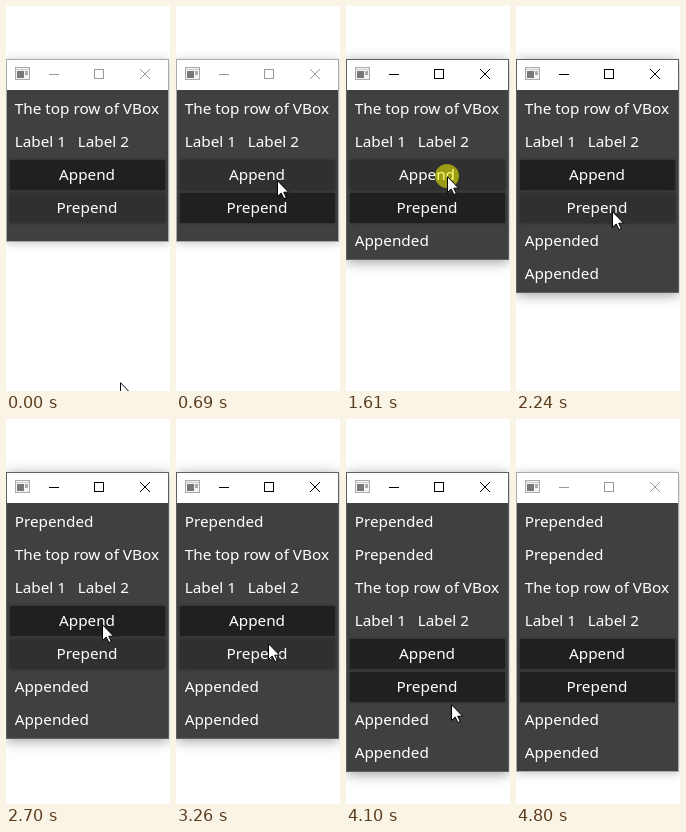
Write an HTML page that moves like this. It is 164 px wide and 385 px high and loops after 4.97 s.

```html
<!DOCTYPE html>
<html lang="en">
<head>
<meta charset="utf-8">
<title>VBox append and prepend</title>
<style>
html, body { margin: 0; width: 100%; height: 100%; overflow: hidden; background: #fff; }
#stage { position: relative; width: 164px; height: 385px; overflow: hidden; background: #fff; }
#win {
  position: absolute; left: 0; top: 53px; width: 163px; box-sizing: border-box;
  border: 1px solid #aaa; background: #404040; overflow: hidden;
  box-shadow: 0 1px 9px rgba(0, 0, 0, .24);
}
#win.active { border-color: #606060; box-shadow: 0 2px 12px rgba(0, 0, 0, .38); }
#bar { position: absolute; left: 0; top: 0; width: 161px; height: 30px; background: #fff; color: #999; }
.active #bar { color: #000; }
.row {
  position: absolute; left: 0; top: 34px; width: 161px; height: 30px;
  font: 15.3px/29px "Noto Sans", "Open Sans", sans-serif; color: #fff; white-space: pre;
}
.row span { position: absolute; top: 0; }
.button {
  left: 3px; width: 155px; text-align: center; text-indent: -1px; background: #202020;
  box-shadow: 0 0 3px rgba(0, 0, 0, .4);
}
.button.hover { background: #303030; }
#ring {
  position: absolute; left: -12px; top: -12px; width: 24px; height: 24px;
  border-radius: 50%; background: rgba(255, 255, 0, .52);
}
#pointer { position: absolute; left: 0; top: 0; }
svg { position: absolute; left: 0; top: 0; overflow: visible; }
</style>
</head>
<body>
<div id="stage">
  <div id="win">
    <div id="bar">
      <svg width="161" height="30" fill="none" stroke="currentColor" shape-rendering="crispEdges">
        <rect x="8.5" y="7.5" width="14" height="12" fill="#f4f4f4" stroke="#aaa"/>
        <path d="M9 9.5h13" stroke="#ccc"/>
        <path d="M10 11h7v7h-7z" fill="#777" stroke="none"/>
        <path d="M18 11h3v4h-3z" fill="#aaa" stroke="none"/>
        <path d="M42 14.5h10M87.5 9.5h9v9h-9z"/>
        <path d="M133 9l10 10M143 9l-10 10" shape-rendering="auto"/>
      </svg>
    </div>
  </div>
  <div id="pointer">
    <div id="ring"></div>
    <svg width="12" height="19">
      <path d="M.5.7v15.8l3.7-3.5 2.7 5.6 2.4-1.1-2.6-5.3h4.9z" fill="#fff" stroke="#000"/>
    </svg>
  </div>
</div>
<script>
const LOOP = 4970;
const $ = id => document.getElementById(id);
const win = $("win"), pointer = $("pointer"), ring = $("ring");

function addRow(texts, button) {
  const row = document.createElement("div");
  row.className = button ? "row button" : "row";
  if (button) row.textContent = texts[0];
  else texts.forEach((text, i) => {
    const span = document.createElement("span");
    span.textContent = text;
    span.style.left = 7.7 + i * 63 + "px";
    row.append(span);
  });
  win.append(row);
  return row;
}

const before = [addRow(["Prepended"]), addRow(["Prepended"])];
const rows = [
  addRow(["The top row of VBox"]),
  addRow(["Label 1", "Label 2"]),
  addRow(["Append"], true),
  addRow(["Prepend"], true),
  addRow(["Appended"]),
  addRow(["Appended"])
];

const appendTimes = [920, 1860];
const prependTimes = [2700, 3780];
const clicks = [[770, 840], [1610, 1780], [2490, 2640], [3630, 3710]];
// [time, index of the highlighted row]
const hovers = [[0, 3], [450, 2], [2090, 3], [4100, -1]];
// [first step, last step, number of steps, x, y]
const moves = [
  [70, 450, 6, 101, 174],
  [1380, 1460, 2, 101, 170],
  [1930, 2240, 5, 96, 205],
  [3020, 3400, 6, 90, 231],
  [3950, 4410, 7, 129, 367],
  [4500, 4570, 2, 133, 392]
];

const count = (times, t) => times.filter(s => t >= s).length;
const ease = p => p * p * (3 - 2 * p);

function pointerAt(t) {
  let x = 114, y = 376;
  for (const [start, end, n, toX, toY] of moves) {
    if (t < start) break;
    const step = Math.floor((t - start + 5) / (end - start) * (n - 1)) + 1;
    const p = ease(Math.min(1, step / n));
    x += (toX - x) * p;
    y += (toY - y) * p;
  }
  return [Math.round(x), Math.round(y)];
}

function place(row, index, shown) {
  row.style.display = shown ? "block" : "none";
  row.style.transform = `translateY(${index * 33}px)`;
}

function render(t) {
  const appended = count(appendTimes, t), prepended = count(prependTimes, t);
  const added = appended + prepended;
  const hover = hovers.filter(h => t >= h[0]).pop()[1];
  before.forEach((row, i) => place(row, i, i < prepended));
  rows.forEach((row, i) => {
    place(row, i + prepended, i < 4 + appended);
    row.classList.toggle("hover", i === hover);
  });
  win.style.height = (added ? 168 + added * 33 : 183) + "px";
  win.classList.toggle("active", t >= 770 && t < 4800);
  const [x, y] = pointerAt(t);
  pointer.style.transform = `translate(${x}px, ${y}px)`;
  ring.style.display = clicks.some(([on, off]) => t >= on && t < off) ? "block" : "none";
}

const began = performance.now();
function tick() {
  render((performance.now() - began) % LOOP);
  requestAnimationFrame(tick);
}
render(0);
requestAnimationFrame(tick);
</script>
</body>
</html>
```
